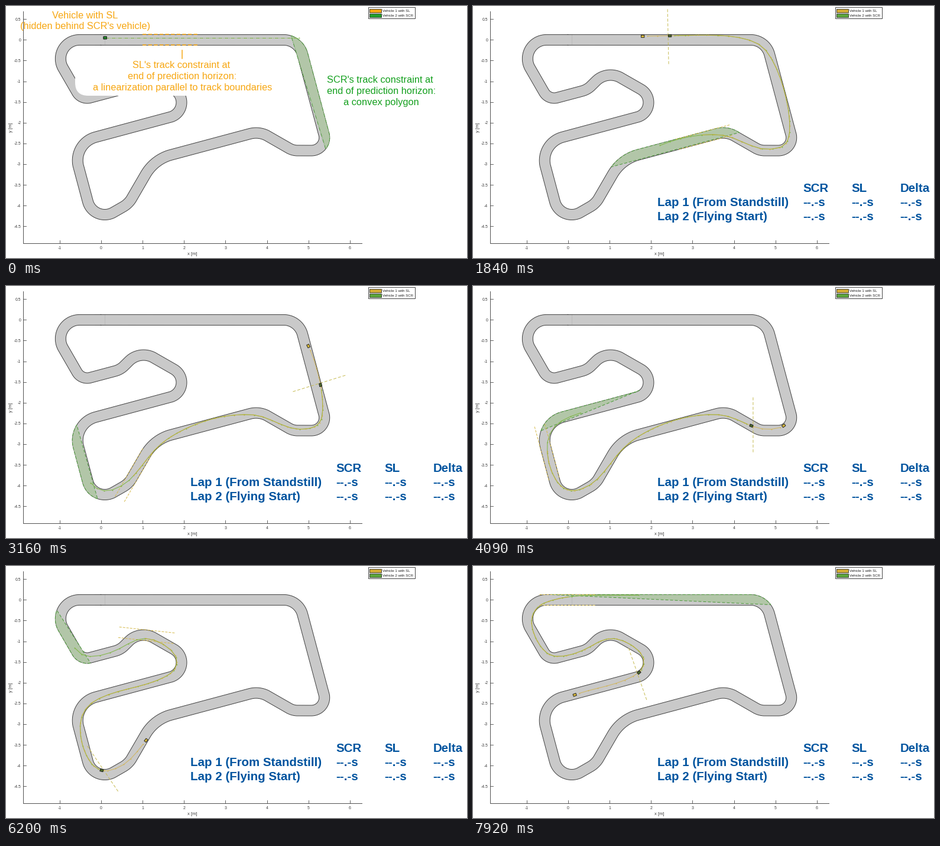
Recreate the animation shown at these times as a matplotlib script. Size 780x427 px, loop 8000 ms.

```python
import numpy as np
import matplotlib.pyplot as plt
from matplotlib.animation import FuncAnimation
from matplotlib.patches import FancyBboxPatch, Polygon, Rectangle

W, H, DPI = 780, 427, 64
PT = 72 / DPI                     # points per pixel
HALF = 9                          # half of the track width
STEP, HOLD, TICK, LOOP = 132.24, 250, 20, 8000
LAUNCH = 1840                     # end of the acceleration phase, ms

plt.rcParams["font.family"] = "Liberation Sans"
ORANGE, GREEN, BLUE = "#f7a712", "#14a01e", "#00549f"
OCHRE, LEAF = "#d3ab35", "#5da63c"

# Corners of the centre line: x, y, fillet radius
CORNERS = np.array([
    (495.1, 57.4, 33), (545.4, 245, 22), (485.6, 245, 31), (428.8, 212.2, 40),
    (251, 259.7, 72), (207.6, 334.8, 40), (148.5, 368.9, 29.7), (112, 232.8, 41),
    (337.9, 172.2, 25.7), (227, 108.3, 35), (193.6, 141.7, 35),
    (127.8, 159.3, 20), (68.9, 57.4, 32)])

# Pace of the leading car: time in ms, x, y
PACE = np.array([
    (0, 168, 57), (LAUNCH, 334, 57), (3160, 533, 168), (4090, 470, 236),
    (5410, 261, 268), (6870, 130, 250), (7920, 281, 181), (8610, 240, 124),
    (10070, 140, 60), (11120, 280, 57)])


def centre_line():
    pts = []
    for i, (x, y, r) in enumerate(CORNERS):
        v = np.array([x, y])
        u = v - CORNERS[i - 1, :2]
        w = CORNERS[(i + 1) % len(CORNERS), :2] - v
        u = u / np.hypot(*u)
        h0 = np.arctan2(u[1], u[0])
        turn = (np.arctan2(w[1], w[0]) - h0 + np.pi) % (2 * np.pi) - np.pi
        g = np.sign(turn)
        mid = v - u * r * np.tan(abs(turn) / 2) + r * g * np.array([-u[1], u[0]])
        h = h0 + turn * np.linspace(0, 1, 40)
        pts.append(mid + r * g * np.column_stack([np.sin(h), -np.cos(h)]))
    p = np.vstack(pts + [pts[0][:1]])
    d = np.r_[0, np.cumsum(np.hypot(*np.diff(p, axis=0).T))]
    s = np.linspace(0, d[-1], int(d[-1]), endpoint=False)
    p = np.column_stack([np.interp(s, d, p[:, k]) for k in (0, 1)])
    return np.roll(p, -np.hypot(*(p - (160, 57.4)).T).argmin(), axis=0)


LINE = centre_line()
N = len(LINE)
IDX = np.arange(N)
TAN = np.roll(LINE, -1, 0) - np.roll(LINE, 1, 0)
TAN /= np.hypot(*TAN.T)[:, None]
LEFT = np.column_stack([TAN[:, 1], -TAN[:, 0]])


def look(arr, s):
    return np.stack([np.interp(s, IDX, c, period=N) for c in arr.T], axis=-1)


def at(s, off=0.0):
    return look(LINE, s) + np.asarray(off)[..., None] * look(LEFT, s)


def racing_offset(m=200, limit=8):
    """Offset from the centre line with the least curvature inside the track."""
    s = np.linspace(0, N, m, endpoint=False)
    p, q = look(LINE, s), look(LEFT, s)
    eye = np.eye(m)
    d2 = np.roll(eye, 1, 0) + np.roll(eye, -1, 0) - 2 * eye
    a = np.vstack([d2 * q[:, 0], d2 * q[:, 1]])
    hess, grad = a.T @ a, a.T @ np.concatenate([d2 @ p[:, 0], d2 @ p[:, 1]])
    e = z = np.zeros(m)
    for i in range(4000):
        new = np.clip(z - (hess @ z + grad) / 16, -limit, limit)
        z = new + i / (i + 3) * (new - e)
        e = new
    return np.interp(IDX, s, e, period=N)


OFFSET = racing_offset()


def race(s):
    """Racing line, reached gradually from the grid position."""
    w = np.clip(np.asarray(s) / 220, 0, 1)
    return at(s, 3.4 * (1 - w) + w * np.interp(s, IDX, OFFSET, period=N))


PACE_S = np.unwrap([float(np.hypot(*(LINE - p).T).argmin()) for p in PACE[:, 1:]],
                   period=N)


def travel(t):
    if t < LAUNCH:
        t = LAUNCH * max(0, (t - HOLD) / (LAUNCH - HOLD)) ** 2
    return np.interp(t, PACE[:, 0], PACE_S)


def clearance():
    """Distance of every pixel from the centre line."""
    y, x = np.mgrid[:H, :W]
    d = np.full((H, W), 1e9)
    for cx, cy in LINE[::4]:
        np.minimum(d, (x - cx) ** 2 + (y - cy) ** 2, out=d)
    return np.sqrt(d)


FIELD = clearance()


def reach(a, side):
    """Longest piece of an edge whose chord stays on the track."""
    sizes = np.arange(30, 526, 5)
    p, q = at(a, side), at(a + sizes, side)
    chord = p + (q - p)[:, None] * np.linspace(0, 1, 40)[:, None]
    x, y = np.rint(chord).astype(int).transpose(2, 0, 1)
    fits = FIELD[y, x].max(1) <= 9.9
    n = sizes[fits].max() if fits.any() else 30
    piece = at(a + np.arange(0, n + 1, 2.0), side)
    px, py = piece.T
    area = abs(px @ np.roll(py, 1) - py @ np.roll(px, 1)) / 2
    return a, n, area, piece


PIECES = [reach(a, side) for a in range(0, N, 5) for side in (HALF, -HALF)]


def convex_region(s):
    around = (h for h in PIECES if (s - h[0]) % N <= min(150, h[1]))
    return max(around, key=lambda h: h[2])[3]


def unit(v):
    return v / np.hypot(*v)


def car_box(s):
    u = unit(race(s + 2) - race(s - 2))
    n = np.array([-u[1], u[0]])
    return np.array([race(s) + a * 2.7 * u + b * 2 * n
                     for a, b in ((-1, -1), (1, -1), (1, 1), (-1, 1))])


def scene(k):
    t = 0 if k == 0 else HOLD + STEP * (k - 1)
    grow = min(1, t / LAUNCH)
    past = t - (100 + 0.075 * t)          # the follower falls back slowly
    ends = {"sl": travel(past + 1650 + 1350 * grow),
            "scr": travel(t + 2650 + 550 * grow)}
    pos = {"sl": travel(past), "scr": travel(t)}
    out = {"hull": convex_region(ends["scr"])}
    for n in pos:
        out[n] = car_box(pos[n])
        out[n + "_plan"] = race(np.linspace(pos[n] + 8, ends[n], 32))
    a, b = race(pos["sl"]), race(pos["scr"])
    if k == 0:
        out["scr_plan"] = np.array([b, (at(ends["scr"])[0], b[1])])
    e = ends["sl"]
    u = 48 * look(TAN, e)
    out["walls"] = [np.array([at(e, o) - u, at(e, o) + u]) for o in (HALF, -HALF)]
    out["gap"] = np.full((2, 2), np.nan)
    if np.hypot(*(a - b)) > 5:
        d = unit(a - b)
        n = 48 * np.array([-d[1], d[0]])
        out["gap"] = np.array([b + 3 * d - n, b + 3 * d + n])
    return out


fig = plt.figure(figsize=(W / DPI, H / DPI), dpi=DPI, facecolor="white")
ax = fig.add_axes([0, 0, 1, 1])
ax.set_xlim(0, W)
ax.set_ylim(H, 0)
ax.axis("off")


def text(x, y, s, size, color, ha="center", **kw):
    return ax.text(x, y, s, fontsize=size * PT, color=color, ha=ha,
                   va=kw.pop("va", "baseline"), **kw)


def line(p=((0, 0), (0, 0)), color="k", lw=1.0, **kw):
    p = np.asarray(p, float)
    return ax.plot(p[:, 0], p[:, 1], color=color, lw=lw * PT, **kw)[0]


def shape(**kw):
    return ax.add_patch(Polygon([(0, 0), (1, 1), (1, 0)], **kw))


def draw_axes():
    ink = "#404040"
    line([(28.5, 9), (28.5, 402), (602, 402)], ink, 0.9)
    for v in range(-1, 7):
        x = 160.9 + 70.15 * v
        line([(x, 402), (x, 397)], ink, 0.8)
        text(x, 412, str(v), 6.9, ink)
    for i in range(-9, 2):
        y = 57.4 - 35.075 * i
        line([(28.5, y), (33.5, y)], ink, 0.8)
        text(25.3, y + 2.6, f"{i / 2:g}", 6.9, ink, "right")
    text(315.5, 422.5, "x [m]", 7.6, ink)
    text(8, 206, "y [m]", 7.6, ink, va="center", rotation=90)


def draw_track():
    ring = np.vstack([LINE, LINE[:2]])
    line(ring, "#c9c9c9", 2 * HALF, solid_joinstyle="round", zorder=1)
    for off in (HALF, -HALF):
        edge = LINE + off * LEFT
        line(np.vstack([edge, edge[:2]]), "#3c3c3c", 0.95, zorder=3)
    line([(167, 49), (167, 66)], "#9a9a9a", 0.8, ls=":", zorder=2)


def draw_legend():
    ax.add_patch(Rectangle((613, 2), 78.5, 18.5, fc="white", ec="#333333", lw=0.9 * PT))
    boxes = []
    for y, name in ((4.5, "Vehicle 1 with SL"), (13, "Vehicle 2 with SCR")):
        boxes.append(ax.add_patch(Rectangle((615, y), 20, 6, ec="#222222", lw=0.8 * PT)))
        text(637, y + 5.3, name, 6.1, "#222222", "left")
    return boxes


def draw_notes():
    box = FancyBboxPatch((117, 75), 338, 77, boxstyle="round,pad=0,rounding_size=22",
                         fc="white", ec="none", zorder=4)
    out = [ax.add_patch(box), line([(298, 75), (298, 89)], ORANGE, 1.5, zorder=9)]
    rows = [
        (134, 21, "Vehicle with SL", ORANGE),
        (134.5, 39.5, "(hidden behind SCR's vehicle)", ORANGE),
        (296.5, 105, "SL's track constraint at", ORANGE),
        (298.5, 124, "end of prediction horizon:", ORANGE),
        (298.5, 143.5, "a linearization parallel to track boundaries", ORANGE),
        (632.5, 130, "SCR's track constraint at", GREEN),
        (635, 149, "end of prediction horizon:", GREEN),
        (635, 168, "a convex polygon", GREEN)]
    return out + [text(x, y, s, 16.4, c, zorder=9) for x, y, s, c in rows]


def draw_table():
    rows = [("", "SCR", "SL", "Delta"),
            ("Lap 1 (From Standstill)",) + ("--.-s",) * 3,
            ("Lap 2 (Flying Start)",) + ("--.-s",) * 3]
    return [text(x, 314.6 + 24 * i, s, 20.5, BLUE, "left", weight="bold", zorder=9)
            for i, cells in enumerate(rows)
            for x, s in zip((312.5, 558.3, 640.5, 722.5), cells) if s]


draw_axes()
draw_track()
legend = draw_legend()
notes = draw_notes()
table = draw_table()

hull = shape(fc="#b2c6a8", ec="#4c9a3a", lw=PT, zorder=3.5)
walls = [line(zorder=5, ls=(0, (4, 2))) for _ in range(2)]
gap = line(color="#c6bb52", ls=(0, (5, 3)), zorder=5)
dots = dict(marker="o", ms=1.8 * PT, mew=0, zorder=6)
plans = {"scr_plan": line(color="#7fb643", **dots),
         "sl_plan": line(color="#d4ae32", alpha=0.7, **dots)}
cars = {n: shape(fc=c, ec="#1c1c1c", lw=0.9 * PT, zorder=z)
        for n, c, z in (("sl", "#d8b93a", 7), ("scr", "#4d6a2c", 8))}

scenes = [scene(k) for k in range(60)]


def update(i):
    t = i * TICK + TICK / 2 - 1
    k = 0 if t < HOLD else min(59, 1 + int((t - HOLD) / STEP))
    sc, first = scenes[k], k == 0
    for a in notes:
        a.set_visible(first)
    for a in table:
        a.set_visible(not first)
    legend[0].set_facecolor(ORANGE if first else OCHRE)
    legend[1].set_facecolor("#22a02c" if first else LEAF)
    hull.set_xy(sc["hull"])
    hull.set_linestyle("-." if first else (0, (5, 3)))
    for w, p in zip(walls, sc["walls"]):
        w.set_data(*p.T)
        w.set_color(ORANGE if first else "#d6bb4c")
        w.set_linewidth((1.6 if first else 1.0) * PT)
    gap.set_data(*sc["gap"].T)
    for n, a in plans.items():
        a.set_data(*sc[n].T)
    plans["sl_plan"].set_visible(not first)
    plans["scr_plan"].set_linestyle("-." if first else "-")
    for n, a in cars.items():
        a.set_xy(sc[n])
    cars["scr"].set_facecolor("#22902c" if first else "#4d6a2c")
    return []


anim = FuncAnimation(fig, update, frames=LOOP // TICK, interval=TICK,
                     init_func=lambda: update(0), repeat=True, repeat_delay=0, blit=False)
plt.show()
```
